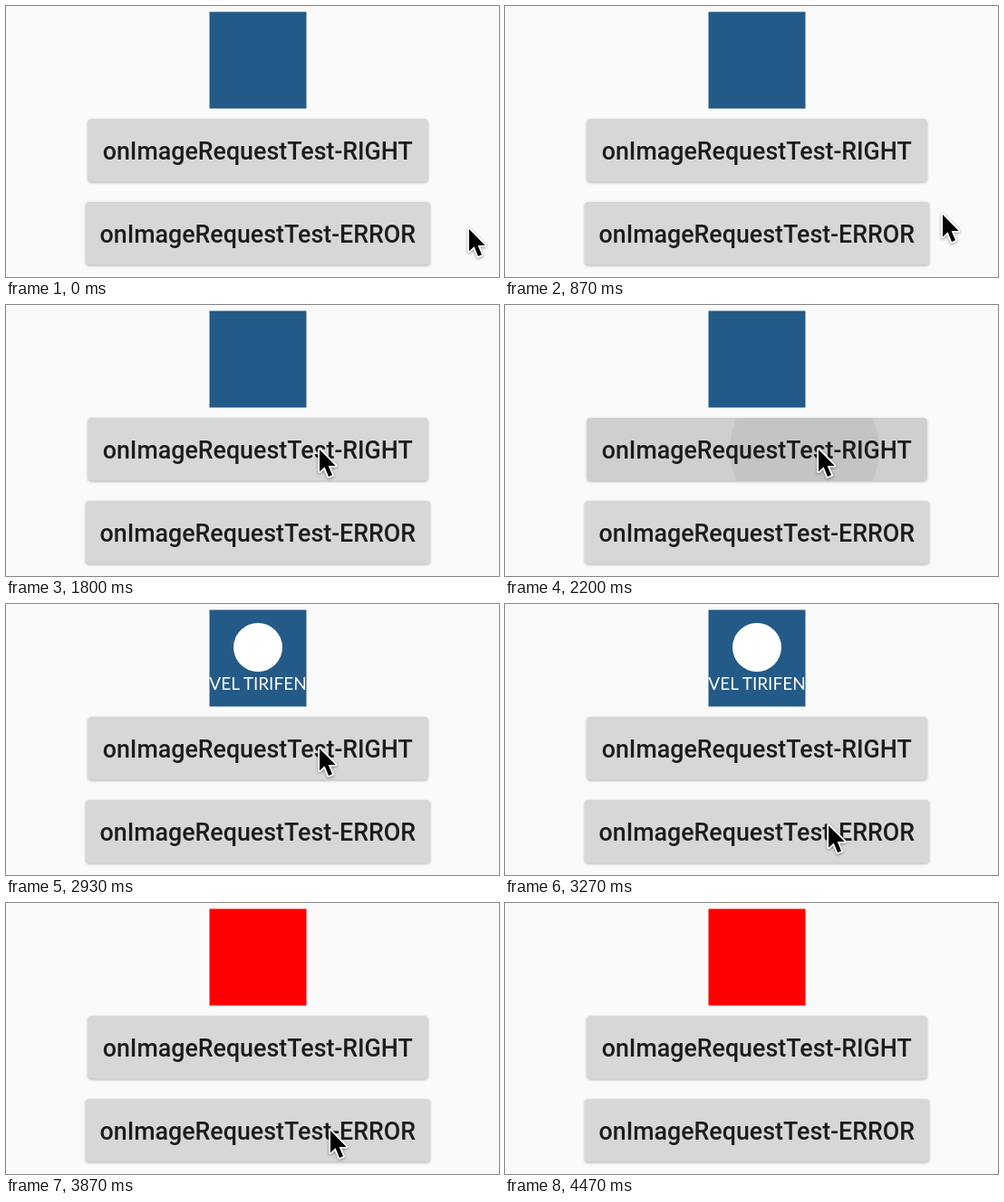
Recreate the animation shown at these times as an HTML page. Size 544 px wide and 300 px high, loop 5790 ms.

```html
<!DOCTYPE html>
<html lang="en">
<head>
<meta charset="utf-8">
<style>
  html, body { margin: 0; width: 100%; height: 100%; overflow: hidden; background: #fafafa; }
  svg { display: block; }
  .button { fill: #d6d7d7; filter: drop-shadow(0 1.5px 1.5px rgba(0, 0, 0, .3)); }
  .label { font: 500 26.8px Roboto, sans-serif; fill: #1c1c1c; text-anchor: middle; }
  .caption { font: 19px Lato, sans-serif; fill: #fff; text-anchor: middle; }
  #arrow { stroke: #fff; stroke-width: 3.6; stroke-linejoin: round; paint-order: stroke;
    filter: drop-shadow(0 1.5px 1.5px rgba(0, 0, 0, .4)); }
  #ring { fill: none; stroke: #000; stroke-opacity: .6; stroke-width: 3; }
</style>
</head>
<body>
<svg width="544" height="300" viewBox="0 0 544 300">
  <clipPath id="clip1"><rect x="90.5" y="125" width="375" height="69.5" rx="4"/></clipPath>
  <clipPath id="clip2"><rect x="88" y="217" width="380" height="69.5" rx="4"/></clipPath>

  <rect id="image" x="224.5" y="6.5" width="107" height="107"/>
  <g id="logo">
    <circle cx="278" cy="48" r="27" fill="#fff"/>
    <text class="caption" x="278" y="95">VEL TIRIFEN</text>
  </g>

  <rect class="button" x="90.5" y="125" width="375" height="69.5" rx="4"/>
  <rect class="button" x="88" y="217" width="380" height="69.5" rx="4"/>
  <g id="ripple1" clip-path="url(#clip1)">
    <rect x="90" y="125" width="376" height="70" opacity=".035"/>
    <circle cx="330.5" cy="160" r="82.5" opacity=".055"/>
  </g>
  <g id="ripple2" clip-path="url(#clip2)">
    <rect x="88" y="217" width="380" height="70" opacity=".035"/>
    <circle cx="354.5" cy="252" r="82.5" opacity=".055"/>
  </g>
  <text class="label" x="277.7" y="170">onImageRequestTest-RIGHT</text>
  <text class="label" x="277.7" y="262">onImageRequestTest-ERROR</text>

  <g id="cursor">
    <circle id="ring" cy="3" r="43.5"/>
    <path id="arrow" d="M0 1V25.5L5.6 20.3 10 31 14 29.3 9.6 18.9H17.6Z"/>
  </g>
</svg>
<script>
  const LOOP = 5790, STEP = 66.25;
  const $ = id => document.getElementById(id);
  const easeOut = p => 1 - (1 - p) ** 1.5;
  const smooth = p => p * p * (3 - 2 * p);

  // start time, step count, from, to, easing
  const moves = [
    [0, 1, [511, 246], [511, 246], smooth],
    [870, 8, [483, 230], [388, 171], easeOut],
    [1403, 5, [388, 171], [346, 159], easeOut],
    [2932, 6, [346, 159], [358, 251], smooth],
    [4333, 1, [358, 251], [361, 280], smooth]
  ];

  const within = (t, a, b) => t >= a && t < b;
  const show = (id, on) => $(id).style.display = on ? '' : 'none';

  // The pointer is sampled at a coarse, fixed rate.
  function pointer(t) {
    const [start, steps, from, to, ease] = moves.findLast(m => t >= m[0]);
    const p = ease(Math.min(Math.floor((t - start + 7) / STEP) / steps, 1));
    return from.map((v, i) => v + (to[i] - v) * p);
  }

  function draw(t) {
    $('image').setAttribute('fill', t < 3870 ? '#235a87' : '#f00');
    show('logo', within(t, 2470, 3870));
    show('ripple1', within(t, 2200, 2270));
    show('ripple2', within(t, 3800, 3870));
    show('ring', within(t, 400, 530) || within(t, 1870, 2000) || within(t, 3530, 3670));
    show('cursor', t < 4470);
    $('cursor').setAttribute('transform', `translate(${pointer(t)})`);
  }

  const origin = performance.now();
  function tick() {
    draw((performance.now() - origin) % LOOP);
    requestAnimationFrame(tick);
  }
  tick();
</script>
</body>
</html>
```
